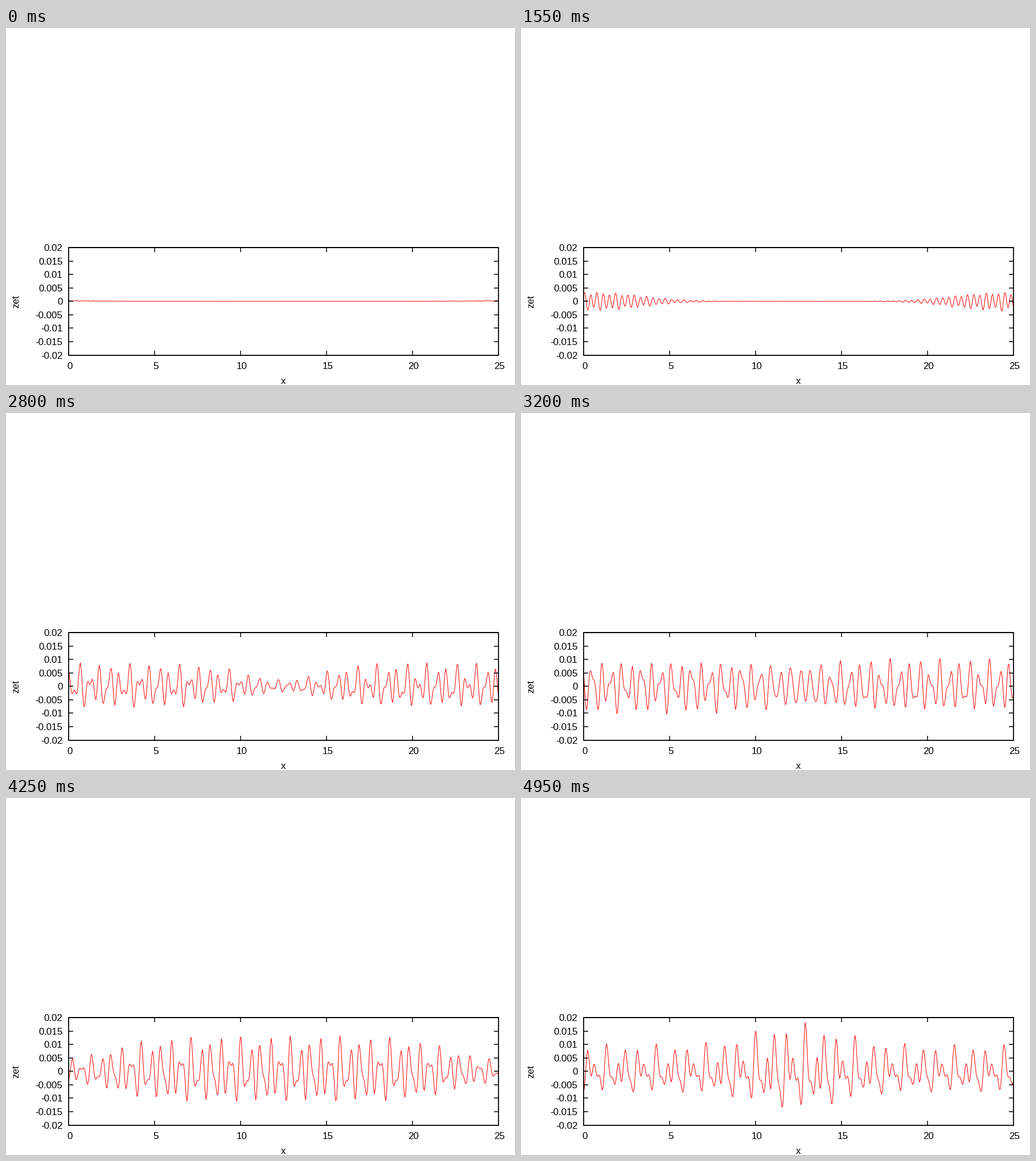
Write a matplotlib script that moves like this. It is 894 px wide and 626 px high and loops after 5000 ms.

```python
import numpy as np
import matplotlib.pyplot as plt
from matplotlib.animation import FuncAnimation

W, H, DPI = 894, 626, 100
FRAMES, INTERVAL = 100, 50
PX = 72 / DPI                      # points per pixel
LEFT, RIGHT, TOP, BOTTOM = 109.5, 864.5, 385, 573.5
LENGTH, Y_MAX = 25, 0.02
PATTERN = 2.89                     # distance after which the wave pattern repeats
T_REF = 4.95

plt.rcParams["font.family"] = "Liberation Sans"

# Amplitudes (in thousandths) of the three interacting waves over time.
TIMES = [0, 0.55, 1.1, 1.55, 2.35, 3.2, 3.85, 4.25, 4.95]
# (waves per pattern, frequency in Hz, phase, early phase shift in cycles, amplitudes)
MODES = [
    (3, 7.43, np.radians(24), 0.25, [0.05, 0.1, 0.2, 0.3, 2, 1.2, 6.5, 6, 7.2]),
    (5, 10.0, np.radians(27), 0.50, [0.05, 0.2, 0.5, 0.6, 3, 6, 7.8, 7.7, 7]),
    (8, 12.98, 0.0, 0.35, [0.15, 0.6, 1.8, 3.2, 3, 3.5, 4.5, 5, 5.1]),
]

x = np.linspace(0, LENGTH, 501)


def px(v):
    return LEFT + v * (RIGHT - LEFT) / LENGTH


def py(v):
    return (TOP + BOTTOM) / 2 - v * (BOTTOM - TOP) / (2 * Y_MAX)


def front(dist, t):
    """Share of a wave train that has travelled the given distance."""
    reach = np.interp(t, [0, 0.5, 1.55, 2.35, 3.2, 4], [1, 1.6, 3.8, 8, 13, 26])
    return 1 / (1 + np.exp((dist - reach) / 1.15))


def envelope(t):
    """Late concentration of the energy around the middle."""
    keys = [3.2, 3.85, 4.25, 4.95]
    edge = np.interp(t, keys, [1, 0.4, 0.3, 0.55])
    width = np.interp(t, keys, [11, 11, 10.5, 3.5])
    power = np.interp(t, keys, [6, 6, 6, 2])
    bell = np.exp(-(np.abs(x - 12.4) / width) ** power)
    return edge + (1 - edge) * bell


def surface(t):
    right, left = front(x, t), front(LENGTH - x, t)
    total = np.maximum(1, right + left)
    early = np.interp(t, [2.35, 3.2], [1, 0])
    lag = np.interp(t, [1.55, 2.35, 3.2], [0.3, 0.09, 0])
    wave = np.zeros_like(x)
    for m, freq, phase, shift, amps in MODES:
        space = 2 * np.pi * (m * (x - 10) / PATTERN - shift * early) - phase
        time = 2 * np.pi * (freq * (t - T_REF) + lag)
        pair = right * np.cos(space - time) + left * np.cos(space + time)
        wave += np.interp(t, TIMES, amps) * pair / total
    swell = np.exp(-x / 2) + np.exp((x - LENGTH) / 2)
    rise = 0.22 * max(0, 1 - t / 0.4) * swell
    return (wave * envelope(t) + rise) / 1000


fig = plt.figure(figsize=(W / DPI, H / DPI), dpi=DPI, facecolor="white")
ax = fig.add_axes([0, 0, 1, 1])
ax.set(xlim=(0, W), ylim=(H, 0))
ax.axis("off")


def rule(xs, ys, width=1.5):
    ax.plot(xs, ys, color="black", lw=width * PX, zorder=3,
            solid_capstyle="butt", solid_joinstyle="miter")


def label(lx, ly, text, **kw):
    ax.text(lx, ly, text, fontsize=17 * PX, color="black", **kw)


rule([LEFT, RIGHT, RIGHT, LEFT, LEFT, RIGHT],
     [TOP, TOP, BOTTOM, BOTTOM, TOP, TOP], 1.8)

for v in range(0, LENGTH + 1, 5):
    if 0 < v < LENGTH:
        rule([px(v)] * 2, [TOP, TOP + 8])
        rule([px(v)] * 2, [BOTTOM, BOTTOM - 8])
    label(px(v) + 2.5, 598, str(v), ha="center", va="baseline")

for i in range(-4, 5):
    v = i * 0.005
    if abs(i) < 4:
        rule([LEFT, LEFT + 8], [py(v)] * 2)
        rule([RIGHT, RIGHT - 8], [py(v)] * 2)
    label(99.5, py(v) + 6, f"{v:g}", ha="right", va="baseline")

label(487, 623.5, "x", ha="center", va="baseline")
label(17.5, 480, "zet", ha="center", va="center", rotation=90)

curve, = ax.plot(px(x), py(surface(0)), color="red", lw=1 * PX, zorder=2)


def update(i):
    curve.set_ydata(py(surface(i * INTERVAL / 1000)))
    return curve,


anim = FuncAnimation(fig, update, frames=FRAMES, interval=INTERVAL,
                     repeat=True, repeat_delay=0, blit=False)
plt.show()
```
